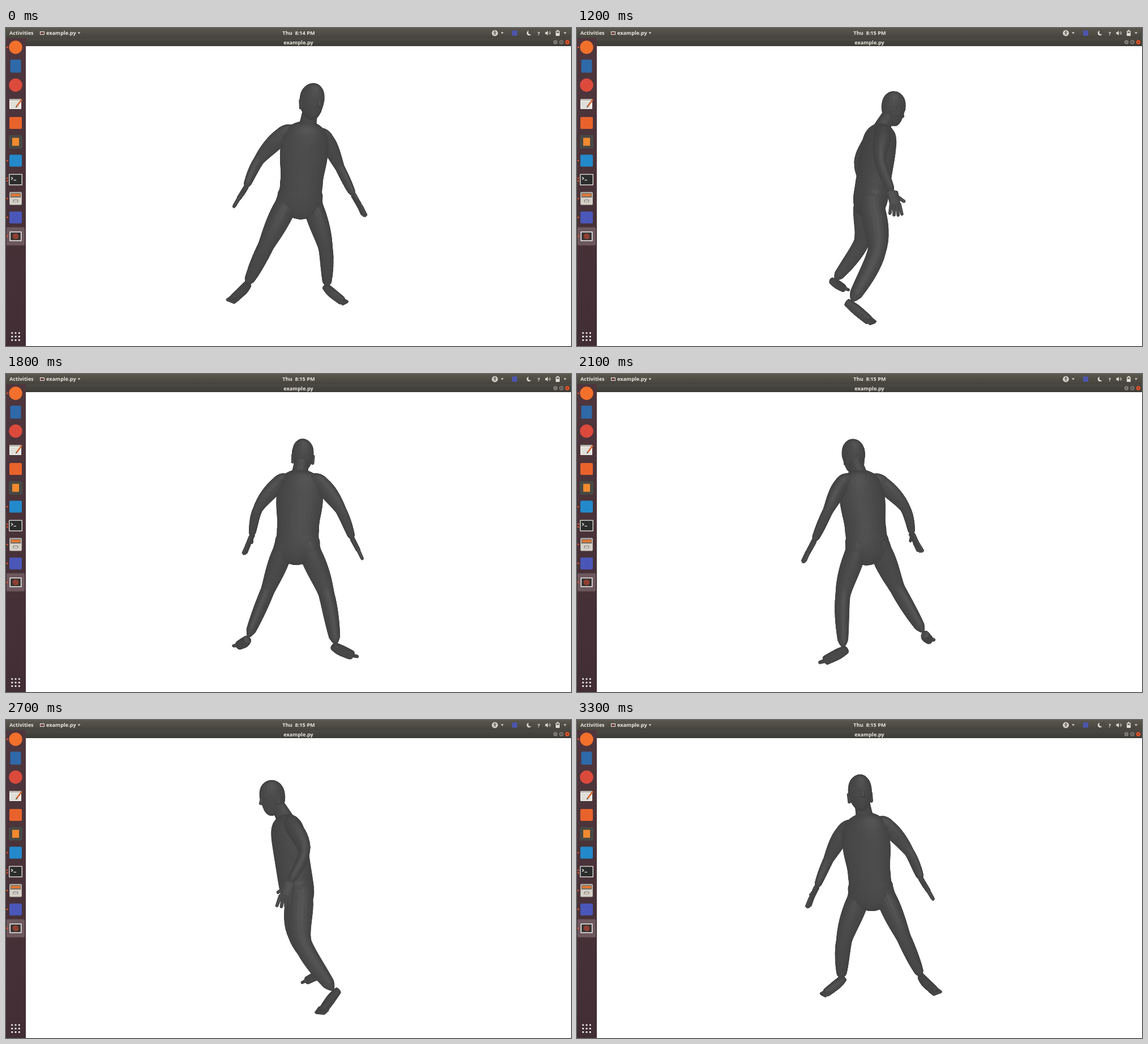
Recreate the animation shown at these times as an HTML page with a canvas. Size 998x561 px, loop 3.6 s.

```html
<!DOCTYPE html>
<html lang="en">
<head>
<meta charset="utf-8">
<title>example.py</title>
<style>
html, body { margin: 0; width: 100%; height: 100%; overflow: hidden; background: #fff; }
canvas { display: block; width: 998px; height: 561px; }
</style>
</head>
<body>
<canvas id="stage"></canvas>
<script>
const W = 998, H = 561, STEP = 300, STEPS = 12;
const { PI, sin, cos, abs, max, min, sqrt, exp, hypot } = Math;
const canvas = document.getElementById('stage');
const ctx = canvas.getContext('2d');
const ratio = window.devicePixelRatio || 1;
canvas.width = W * ratio;
canvas.height = H * ratio;
ctx.scale(ratio, ratio);

// ---------- camera: one uneven turn, dragged by hand ----------
const CX = 516.5, CY = 296.5, DIST = 700, RAD = PI / 180;
function pose(step) {
  const a = PI * step / (STEPS - 1);
  const sway = step > 6 ? -4.3 : 3;
  return {
    yaw: (12 + 30.5 * step - 28 * sin(a) - 5 * sin(2 * a)) * RAD,
    roll: (sway + 1.2 * cos(PI * step / 2)) * RAD
  };
}

// ---------- body mesh: x = its left, y = down, z = forward ----------
const quads = [];
const cross = (a, b) => [a[1] * b[2] - a[2] * b[1], a[2] * b[0] - a[0] * b[2], a[0] * b[1] - a[1] * b[0]];
const sub = (a, b) => a.map((v, i) => v - b[i]);
const unit = a => { const l = hypot(...a) || 1; return a.map(v => v / l); };

// Skins elliptical rings f(t) = [x, y, z, width radius, depth radius]
function loft(f, { rings: n = 36, seg = 24, place = p => p } = {}) {
  const path = Array.from({ length: n + 1 }, (_, i) => f((1 - cos(PI * i / n)) / 2));
  const mesh = path.map((p, i) => {
    const t = unit(sub(path[min(i + 1, n)].slice(0, 3), path[max(i - 1, 0)]));
    const v = unit([-t[0] * t[2], -t[1] * t[2], 1 - t[2] * t[2]]);
    const u = cross(v, t);
    return Array.from({ length: seg }, (_, j) => {
      const a = 2 * PI * j / seg;
      const q = place(u.map((_, k) => p[k] + u[k] * p[3] * cos(a) + v[k] * p[4] * sin(a)));
      return [q[0] + max(0, 5 - abs(q[0]) / 16), q[1], q[2]];
    });
  });
  for (let i = 0; i < n; i++)
    for (let j = 0; j < seg; j++) {
      const k = (j + 1) % seg;
      quads.push([mesh[i][j], mesh[i][k], mesh[i + 1][k], mesh[i + 1][j]]);
    }
}

// A rounded tube through joints [x, y, z, radius]; swell adds muscle between them
function limb(joints, { swell = 0, depth = 1, ...opts } = {}) {
  const last = joints.length - 1;
  loft(t => {
    const i = min(last - 1, Math.floor(t * last)), s = t * last - i;
    const [a, b, c, d] = [-1, 0, 1, 2].map(k => joints[max(0, min(last, i + k))]);
    const p = b.map((v, n) => v + s / 2 * (c[n] - a[n]
      + s * (2 * a[n] - 5 * v + 4 * c[n] - d[n] + s * (3 * (v - c[n]) + d[n] - a[n]))));
    const r = (p[3] + swell * sin(PI * s)) * min(1, sqrt(16 * min(t, 1 - t)) + .02);
    return [p[0], p[1], p[2], r, r * depth];
  }, opts);
}

const bump = (y, at, width) => exp(-(((y - at) / width) ** 2));

function buildTrunk() {
  loft(t => {
    const u = 2 * t - 1, y = 85 * u - 45;
    const taper = max(.01, 1 - u ** 6) ** .6;
    const pinch = 5 * bump(y, -28, 28) + 2 * bump(y, -12, 4);
    return [0, y, 3.6 - .085 * y, max(.3, (42 - pinch) * taper), 30 * taper];
  }, { rings: 44, seg: 36 });
}

function buildHead() {
  const c = cos(22 * RAD), s = sin(22 * RAD);
  const place = ([x, y, z]) => [x * c + (z - 34) * s, y, 34 + (z - 34) * c - x * s];
  limb([[0, -112, 11, 17], [0, -132, 19, 13.5], [0, -154, 31, 12.5]], { rings: 20 });
  loft(t => {
    const v = 2 * t - 1, jaw = max(0, v);
    const r = max(.02, sqrt(1 - abs(v) ** 2.6)) * (1 - .2 * jaw);
    return [0, 29 * v - 161, 34 + 11 * jaw * jaw, 19.5 * r, 22.5 * r];
  }, { place });
  const small = { place, rings: 10, seg: 10 };
  limb([[0, -160, 54, 2], [0, -148, 57, 3]], small);
  for (const m of [-1, 1])
    limb([[m * 19, -161, 30, 2.4], [m * 19, -145, 32, 2]], { ...small, depth: 2 });
}

// m = 1 for its left side, -1 for its right; the left arm swings further forward
function buildSide(m) {
  const part = (joints, opts) => limb(joints.map(([x, ...rest]) => [m * x, ...rest]), opts);
  const small = { rings: 10, seg: 8 };
  const wrist = 17 + 6 * m, tip = 25 + 11 * m, knuckle = (wrist + tip) / 2 + 2;

  part([[20, -112, 8, 10], [41, -101, 5, 13.5], [74, -57, -6, 8.5], [94, -8, wrist, 4.6]], { swell: 1.3 });
  part([[93, -10, wrist, 4], [105, 12, knuckle, 3.5]], { ...small, depth: 2.3, seg: 14 });
  for (let i = -1.5; i < 2; i++)
    part([[103, 8, knuckle + i * 4.2, 2.6], [113 - abs(i), 28 - 2 * abs(i), tip + i * 6.6, 1.9]], small);
  part([[95, -5, wrist + 3, 3.2], [100, 5, wrist + 20, 2]], small);

  part([[18, 0, 2, 15], [25, 18, 1, 18], [53, 88, 6, 12.7], [75, 165, -35, 6.5]],
    { swell: 1.9, depth: 1.15, rings: 44 });
  part([[73, 167, -44, 6.5], [83, 176, -30, 8.5], [101, 188, -12, 7.5]], { depth: .8, rings: 20 });
  for (let i = -2; i < 3; i++)
    part([[97 + 3 * i, 186, -15 - 2.4 * i, 2.6], [105 + 2.7 * i, 190 - .4 * i, -7 - 2.4 * i, 2.3]], small);
}

buildTrunk();
buildHead();
buildSide(-1);
buildSide(1);

function drawBody(step) {
  const { yaw, roll } = pose(step);
  const cy = cos(yaw), sy = sin(yaw), cr = cos(roll), sr = sin(roll);
  const view = ([x, y, z]) => {
    const a = x * cy + z * sy;
    return [a * cr - y * sr, a * sr + y * cr, z * cy - x * sy];
  };
  const project = ([x, y, z]) => {
    const s = DIST / (DIST - z);
    return [CX + x * s, CY + y * s];
  };
  const faces = [];
  for (const quad of quads) {
    const v = quad.map(view), p = v.map(project);
    const [d1, d2] = [sub(p[2], p[0]), sub(p[3], p[1])];
    if (d1[0] * d2[1] <= d1[1] * d2[0]) continue;
    const n = unit(cross(sub(v[2], v[0]), sub(v[3], v[1])));
    const glow = max(0, n[0] * .12 - n[1] * .38 + n[2] * .917);
    const depth = v.reduce((sum, q) => sum + q[2], 0);
    faces.push({ p, depth, grey: Math.round(65 + 9 * n[2] ** 2 + 13 * glow ** 14) });
  }
  faces.sort((a, b) => a.depth - b.depth);
  ctx.lineWidth = 1;
  ctx.lineJoin = 'round';
  for (const { p, grey } of faces) {
    ctx.strokeStyle = `rgb(${grey},${grey},${grey})`;
    shape(ctx.strokeStyle, ...p);
    ctx.stroke();
  }
}

// ---------- desktop ----------
const INK = '#dfdbd2';

function shape(color, ...pts) {
  ctx.beginPath();
  pts.forEach(([x, y]) => ctx.lineTo(x, y));
  ctx.closePath();
  ctx.fillStyle = color;
  ctx.fill();
}
function box(x, y, w, h, color, r = 0) {
  ctx.fillStyle = color;
  ctx.beginPath();
  ctx.roundRect(x, y, w, h, r);
  ctx.fill();
}
function dot(x, y, r, color) {
  ctx.fillStyle = color;
  ctx.beginPath();
  ctx.arc(x, y, r, 0, 7);
  ctx.fill();
}
function line(color, width, ...pts) {
  ctx.strokeStyle = color;
  ctx.lineWidth = width;
  ctx.beginPath();
  pts.forEach(([x, y]) => ctx.lineTo(x, y));
  ctx.stroke();
}
function fade(y0, y1, top, bottom) {
  const g = ctx.createLinearGradient(0, y0, 0, y1);
  g.addColorStop(0, top);
  g.addColorStop(1, bottom);
  return g;
}
function text(s, x, y, align = 'left') {
  ctx.font = '700 9.2px "Open Sans", "Noto Sans", sans-serif';
  ctx.textAlign = align;
  ctx.fillStyle = '#e9e6df';
  ctx.fillText(s, x, y);
}
const arrow = x => shape(INK, [x, 7.5], [x + 5, 7.5], [x + 2.5, 10.5]);

function drawTray() {
  dot(863.5, 9, 5.3, INK);
  dot(863.5, 6, 1, '#4a4842');
  line('#4a4842', 1, [860.5, 7.8], [866.5, 7.8]);
  line('#4a4842', 1, [861.8, 12.5], [863.5, 8], [865.2, 12.5]);
  arrow(874);
  box(894, 4.5, 9, 9, '#4d55b0', 1);
  dot(924, 9, 4.2, INK);
  dot(926.3, 7.6, 3.8, '#4f4d45');
  text('?', 941, 12.5, 'center');
  shape(INK, [952.5, 7.3], [954.5, 7.3], [957, 5], [957, 13], [954.5, 10.7], [952.5, 10.7]);
  ctx.strokeStyle = INK;
  for (const r of [2, 4]) {
    ctx.beginPath();
    ctx.arc(957.5, 9, r, -.9, .9);
    ctx.stroke();
  }
  box(971, 5, 7, 9, INK, 1);
  box(973, 3.7, 3, 2, INK);
  box(972.3, 6.5, 4.4, 2, '#4a4842');
  arrow(985);
}

function drawBars(clock) {
  box(0, 0, W, 18, fade(0, 18, '#5a574e', '#45433d'));
  box(35, 18, W - 35, 14, fade(18, 32, '#4b4942', '#3c3b37'));
  text('Activities', 6, 12);
  box(60, 6, 8, 6, '#e9e6df');
  box(61, 7.2, 6, 3.8, '#6b4040');
  text('example.py', 71, 12);
  arrow(126.5);
  text(clock, 517, 12, 'center');
  text('example.py', 516.5, 28.5, 'center');
  drawTray();
  for (let i = 0; i < 3; i++) {
    dot(970.5 + 10.5 * i, 25, 4.3, '#33322e');
    dot(970.5 + 10.5 * i, 25, 3.8, i < 2 ? '#85817a' : '#e9592c');
  }
  line('#3d3b37', 1, [968.8, 25], [972.2, 25]);
  ctx.strokeRect(979.5, 23.7, 3, 2.6);
  line('#5a2413', 1, [990, 23.5], [993, 26.5]);
  line('#5a2413', 1, [993, 23.5], [990, 26.5]);
}

// Dock icons, drawn around their own centre
const disc = color => () => dot(0, 0, 11.7, color);
const tile = (color, w = 22, h = 21) => () => box(-w / 2, -h / 2, w, h, color, 2);

function notepad() {
  box(-11, -9, 21, 18, '#eceae5', 1);
  box(-11, -9, 21, 3, '#b9b5ae', 1);
  for (let y = -3; y < 8; y += 3) line('#bdbab4', .8, [-9, y], [6, y]);
  line('#d9642d', 2.6, [11, -8], [2, 4]);
  shape('#4b3a30', [1, 3], [3, 5], [0, 6.5]);
}
function darkTile() {
  box(-12, -12, 24, 24, '#484945', 2);
  box(-6, -7, 12, 14, '#f28a2e');
}
function terminal() {
  box(-12, -10, 24, 20, '#d4d2cc', 1);
  box(-10.5, -8.5, 21, 17, '#2b2d2c');
  line('#f0f0ee', 1.2, [-8, -4.5], [-5, -2.3], [-8, 0]);
  line('#f0f0ee', 1.2, [-3.5, 1], [1, 1]);
}
function cabinet() {
  box(-11, -11.5, 22, 23, '#b8b3aa', 2);
  box(-9, -9.5, 18, 8, '#77726a', 1);
  box(-8, -8, 16, 4, '#e8772f');
  box(-10, -1.5, 20, 12, '#d5d1c8', 1);
  box(-4.5, 2, 9, 4.5, '#8d877e', 1);
  box(-3, 3.5, 6, 2, '#f1eee8');
}
function blocked() {
  box(-16, -16, 32, 32, '#6d585e', 2);
  box(-10.5, -8.5, 21, 17, '#f1efed');
  box(-9, -7, 18, 14, '#3a3634');
  dot(0, 0, 4.8, '#b5402f');
  dot(0, 0, 3.2, '#6d4038');
  line('#b5402f', 1.5, [-3, -3], [3, 3]);
}
const ICONS = [disc('#f2702b'), tile('#2f69a8', 19, 23), disc('#dc4a3c'), notepad, tile('#e8632b'),
  darkTile, tile('#2489ca'), terminal, cabinet, tile('#4b57b8'), blocked];
const RUNNING = [0, 6, 7, 8, 9, 10];

function drawDock() {
  box(0, 18, 35, H - 18, fade(18, H, '#4f363d', '#412e34'));
  ICONS.forEach((icon, i) => {
    ctx.save();
    ctx.translate(17, 34 + 33.35 * i);
    icon();
    if (RUNNING.includes(i))
      for (const y of icon === terminal ? [-2.5, 2.5] : [0]) dot(-14.7, y, 1.4, '#e2582e');
    ctx.restore();
  });
  for (let i = 0; i < 9; i++)
    dot(10.7 + i % 3 * 6.3, 538 + Math.floor(i / 3) * 6.3, 1.6, '#f3f1ef');
}

function render(step) {
  box(0, 0, W, H, '#fff');
  drawBody(step);
  drawDock();
  drawBars(step < 4 ? 'Thu  8:14 PM' : 'Thu  8:15 PM');
}

let shown = -1;
function tick() {
  const step = Math.floor(performance.now() / STEP) % STEPS;
  if (step !== shown) render(shown = step);
  requestAnimationFrame(tick);
}
tick();
</script>
</body>
</html>
```
